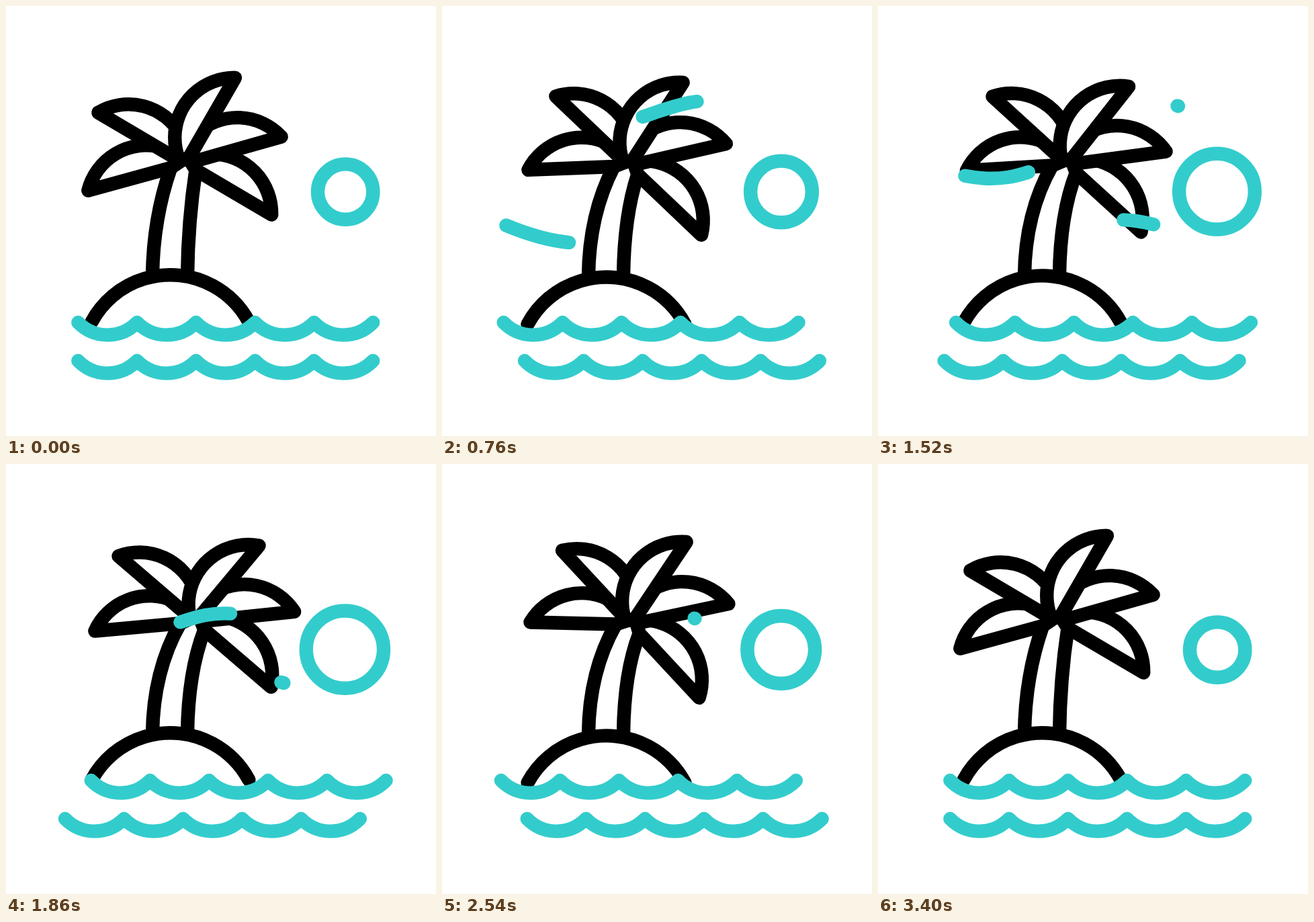
Write an HTML page with a canvas that moves like this. It is 640 by 640 pixels and loops after 3620 ms.

```html
<!DOCTYPE html>
<html lang="en">
<head>
<meta charset="utf-8">
<title>Palm island</title>
<style>
html, body { margin: 0; width: 100%; height: 100%; overflow: hidden; background: #fff; }
canvas { display: block; width: 640px; height: 640px; }
</style>
</head>
<body>
<canvas id="stage" width="640" height="640"></canvas>
<script>
const ctx = document.getElementById('stage').getContext('2d');
const LOOP = 3620, START = 200, BEAT = 800, STEP = 20;
const BLACK = '#000', TEAL = '#33cccc';
const RAD = Math.PI / 180;

const clamp = x => Math.min(1, Math.max(0, x));
const smooth = x => x * x * (3 - 2 * x);
const easeOut = x => 1 - (1 - clamp(x)) ** 2;

// Eased value through four beats: rest, lean, far, lean, rest.
function sway(t, rest, lean, far) {
  const keys = [rest, lean, far, lean, rest];
  const p = Math.min(3.99999, Math.max(0, (t - START) / BEAT));
  const i = Math.floor(p);
  return keys[i] + (keys[i + 1] - keys[i]) * smooth(p - i);
}

function pen(color) {
  ctx.strokeStyle = color;
  ctx.lineWidth = 20.4;
  ctx.lineCap = ctx.lineJoin = 'round';
  ctx.fillStyle = '#fff';
}

// Leaves in paint order: angle, length, arc side, arc angle at the tip, gap to the crown
const LEAVES = [
  { angle: 30.5, len: 148.8, side: -1, bulge: 60.5, gap: 18, droop: true },
  { angle: 344.2, len: 148.3, side: -1, bulge: 63, gap: 10, droop: false },
  { angle: 164.7, len: 150, side: 1, bulge: 60.5, gap: 22.5, droop: true },
  { angle: 210.5, len: 150.5, side: 1, bulge: 61, gap: 10, droop: true },
  { angle: 300, len: 148, side: -1, bulge: 60.5, gap: 10, droop: false }
];
const LEAF_R = 89;

function drawLeaf(leaf, x, y, turn) {
  const cx = leaf.len - LEAF_R * Math.sin(leaf.bulge * RAD);
  const cy = -LEAF_R * Math.cos(leaf.bulge * RAD);
  const from = Math.atan2(-cy, leaf.len - cx);
  const to = Math.PI - Math.acos(cx / LEAF_R);
  ctx.save();
  ctx.translate(x, y);
  ctx.rotate((leaf.angle + turn) * RAD);
  ctx.scale(1, leaf.side);
  ctx.beginPath();
  ctx.moveTo(leaf.gap, 0);
  ctx.lineTo(leaf.len, 0);
  ctx.arc(cx, cy, LEAF_R, from, to);
  ctx.closePath();
  ctx.fill();
  ctx.stroke();
  ctx.restore();
}

function drawTrunk(x, y, turn) {
  const bend = (x - 267) / 14.5;
  const top = leaf => {
    const a = (leaf.angle + turn) * RAD;
    return [x + leaf.gap * Math.cos(a), y + leaf.gap * Math.sin(a)];
  };
  ctx.beginPath();
  ctx.moveTo(218, 402);
  ctx.quadraticCurveTo(219, 316 - 8 * bend, ...top(LEAVES[2]));
  ctx.moveTo(270, 402);
  ctx.quadraticCurveTo(271, 320 - 10 * bend, ...top(LEAVES[0]));
  ctx.stroke();
}

function drawPalm(t) {
  const x = sway(t, 267, 281.4, 281.7);
  const y = sway(t, 235, 239, 235);
  const droop = sway(t, 0, 16.7, 10);
  const lean = sway(t, 0, 3.7, 10);
  pen(BLACK);
  drawTrunk(x, y, droop);
  for (const leaf of LEAVES) drawLeaf(leaf, x, y, leaf.droop ? droop : lean);
}

function drawIsland(t) {
  const half = 117, rise = 70;
  const r = (half * half + rise * rise) / (2 * rise);
  const a = Math.asin(half / r);
  const top = 400.2 + sway(t, 0, 4.3, 0);
  pen(BLACK);
  ctx.beginPath();
  ctx.arc(244.5, top + r, r, -Math.PI / 2 - a, -Math.PI / 2 + a);
  ctx.stroke();
}

function drawWave(x, y) {
  const width = 87.8, dip = 18.6;
  const r = (width * width / 4 + dip * dip) / (2 * dip);
  const a = Math.asin(width / 2 / r);
  pen(TEAL);
  ctx.beginPath();
  for (let i = 0; i < 5; i++) {
    ctx.arc(x + width * (i + 0.5), y + dip - r, r, Math.PI / 2 + a, Math.PI / 2 - a, true);
  }
  ctx.stroke();
}

function drawSun(t) {
  const half = START + 2 * BEAT;
  const k = smooth(clamp(1 - Math.abs(t - half) / (2 * BEAT)));
  pen(TEAL);
  ctx.beginPath();
  ctx.arc(505.2 - 0.8 * k, 276.6 - 0.5 * k, 41.2 + 16.5 * k, 0, 2 * Math.PI);
  ctx.stroke();
}

const GUST = 'M0 0C35 15 70 26 105 28.5C150 31 172 18 205 8C245 -5 270 -12 324 2';
const gustPath = new Path2D(GUST);
const gustLength = (() => {
  const p = document.createElementNS('http://www.w3.org/2000/svg', 'path');
  p.setAttribute('d', GUST);
  return p.getTotalLength();
})();

function drawGust(t, x, y, begin) {
  const age = t - begin;
  const head = easeOut(age / 1040) * gustLength;
  const tail = easeOut((age - 165) / 1250) * gustLength;
  if (age <= 0 || tail >= gustLength) return;
  ctx.save();
  pen(TEAL);
  ctx.translate(x, y);
  ctx.setLineDash([Math.max(0.1, head - tail), 2 * gustLength]);
  ctx.lineDashOffset = -tail;
  ctx.stroke(gustPath);
  ctx.restore();
}

function draw(t) {
  ctx.fillStyle = '#fff';
  ctx.fillRect(0, 0, 640, 640);
  drawPalm(t);
  drawIsland(t);
  drawSun(t);
  const drift = sway(t, 0, 20, -20);
  drawWave(107.3 - drift, 471);
  drawWave(107.3 + drift, 528);
  drawGust(t, 123, 147, 190);
  drawGust(t, 89.5, 324, 583);
  drawGust(t, 52.5, 228, 1193);
}

const origin = performance.now();
function tick() {
  const t = Math.max(0, performance.now() - origin) % LOOP;
  draw(Math.floor(t / STEP) * STEP);
  requestAnimationFrame(tick);
}
tick();
</script>
</body>
</html>
```
